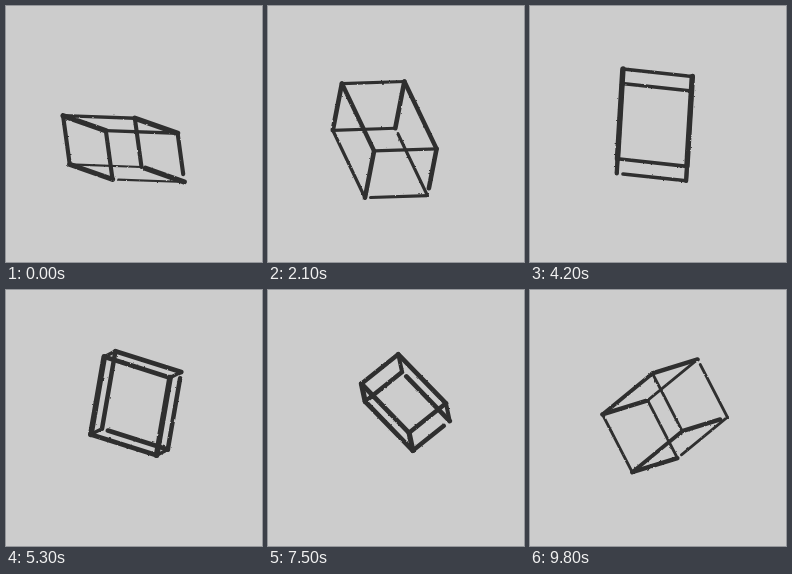
An HTML page for the animation above (10000 ms loop, 256 px wide and 256 px high).

```html
<!DOCTYPE html>
<html lang="en">
<head>
<meta charset="utf-8">
<title>Turning box</title>
<style>
  html, body { margin: 0; width: 100%; height: 100%; overflow: hidden; background: #ccc; }
  svg { display: block; width: 100%; height: 100%; }
</style>
</head>
<body>
<svg viewBox="0 0 256 256">
  <filter id="rough" filterUnits="userSpaceOnUse" x="0" y="0" width="256" height="256" color-interpolation-filters="sRGB">
    <feTurbulence type="fractalNoise" baseFrequency="0.3" numOctaves="2" seed="4"/>
    <feDisplacementMap in="SourceGraphic" scale="2" xChannelSelector="R" yChannelSelector="G"/>
  </filter>
  <g id="box" filter="url(#rough)" stroke="#2f2f2f" stroke-linecap="round"></g>
</svg>
<script>
const LOOP = 10000;
const SPIN = 0.05; // radians per step

// Each coordinate is mean + cosine * cos(angle) + sine * sin(angle).
const CENTER = [[126.9, 0.95, 11.08], [126.9, -11.77, -10.96]];
const AXES = [
  [[48.44, 19.36, -8.36], [28.17, -13.07, 27.48]],
  [[18.25, -12.25, 24.76], [11.46, -9.31, -40.29]],
  [[32.93, -44.47, -14.0], [20.76, 63.62, -27.99]]
];

// Line weight of the edges along each axis; "side" is the sign on the middle axis.
const WEIGHTS = [
  step => 4.1 + 1.2 * Math.cos(2 * SPIN * (step - 59)),
  step => 4.1 + 0.6 * Math.cos(2 * SPIN * (step - 78)),
  (step, side) => 3.8 + 1.3 * Math.cos(SPIN * (step - 51)) - 0.6 * side
];

// Open ends [start, end] of the three edges that stop short of their corner.
const GAPS = [[0.09, 0], [0, 0.16], [0.08, 0]];

const box = document.getElementById("box");
const edges = [];
for (let axis = 0; axis < 3; axis++) {
  for (const p of [-1, 1]) for (const q of [-1, 1]) {
    const signs = [p, q];
    signs.splice(axis, 0, 0);
    const line = document.createElementNS("http://www.w3.org/2000/svg", "line");
    box.append(line);
    edges.push({ axis, signs, line, gap: p + q === 2 ? GAPS[axis] : [0, 0] });
  }
}

// Steps last 100 ms; every tenth one is held for 200 ms.
function stepAt(time) {
  if (time < 100) return 0;
  const group = Math.floor((time - 100) / 1100);
  return 10 * group + Math.min(10, Math.floor((time - 1100 * group) / 100));
}

function draw(time) {
  const step = Math.min(90, stepAt(time));
  const angle = SPIN * (step - 45);
  const point = pair => pair.map(([mean, c, s]) => mean + c * Math.cos(angle) + s * Math.sin(angle));
  const center = point(CENTER);
  const vectors = AXES.map(point);
  const place = signs => center.map((value, d) =>
    vectors.reduce((sum, vector, k) => sum + signs[k] * vector[d] / 2, value));

  for (const { axis, signs, line, gap } of edges) {
    const end = amount => place(signs.map((sign, k) => k === axis ? amount : sign));
    const [x1, y1] = end(-1 + 2 * gap[0]);
    const [x2, y2] = end(1 - 2 * gap[1]);
    const attributes = { x1, y1, x2, y2, "stroke-width": WEIGHTS[axis](step, signs[1]) };
    for (const name in attributes) line.setAttribute(name, attributes[name].toFixed(2));
  }
}

const start = performance.now();
function tick() {
  draw((performance.now() - start) % LOOP);
  requestAnimationFrame(tick);
}
tick();
</script>
</body>
</html>
```
